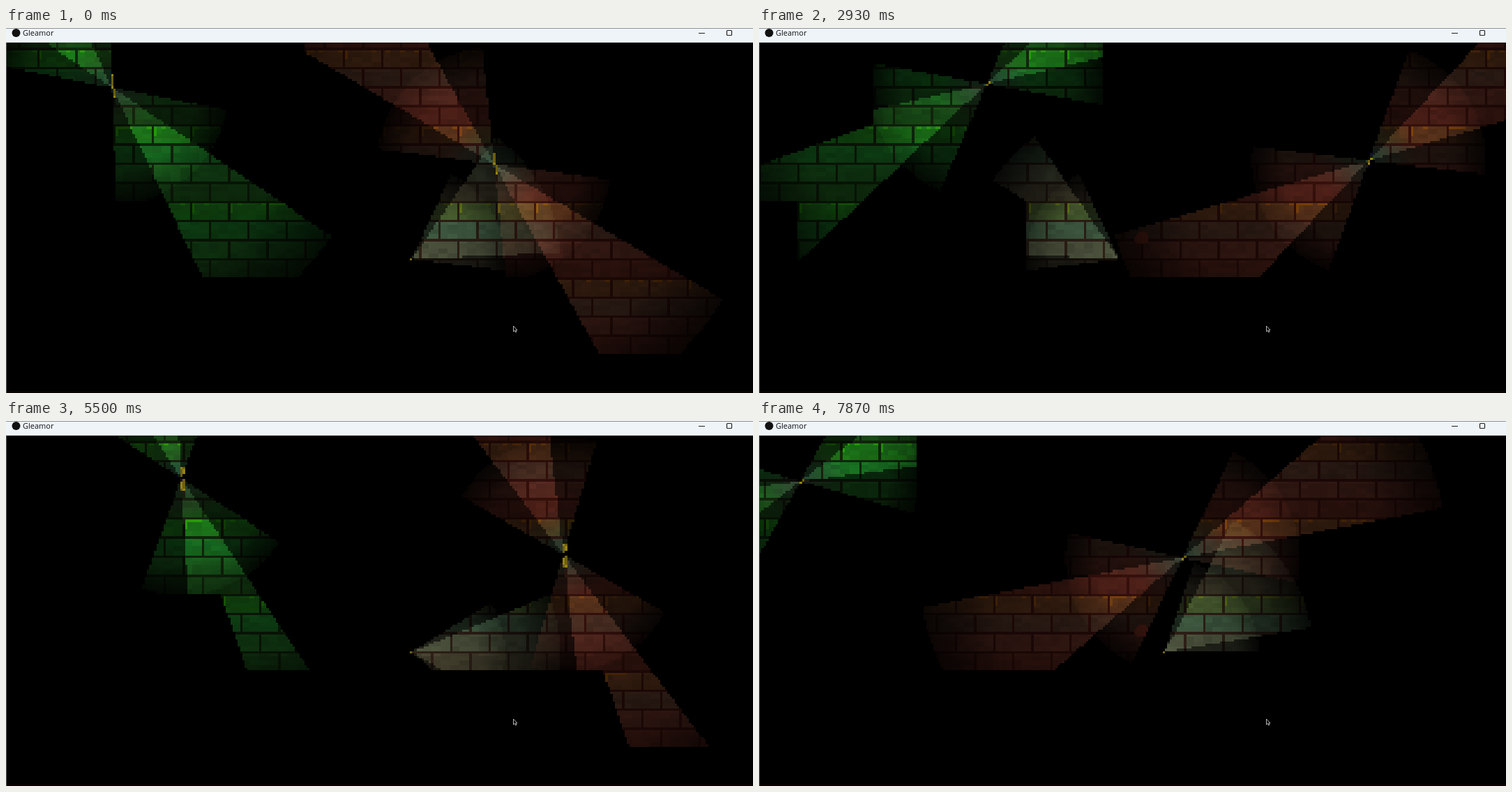
An HTML page with a canvas that plays this animation: 1071x523 px, repeating every 7.89 s.

```html
<!DOCTYPE html>
<html lang="en">
<head>
<meta charset="utf-8">
<title>Gleamor</title>
<style>
  html, body { margin: 0; width: 100%; height: 100%; overflow: hidden; background: #000; }
  #stage { position: relative; width: 1071px; height: 523px; overflow: hidden; background: #000; }
  canvas { position: absolute; left: 0; image-rendering: pixelated; }
  svg { position: absolute; left: 0; top: 0; }
  text { font: 11px "Open Sans", "Noto Sans", sans-serif; fill: #111; }
</style>
</head>
<body>
<div id="stage">
  <canvas id="view"></canvas>
  <svg width="1071" height="523" viewBox="0 0 1071 523">
    <rect width="1071" height="21" fill="#eff4f9"/>
    <rect width="1071" height="1" fill="#8d9196"/>
    <rect y="20" width="1071" height="1" fill="#c9ced3"/>
    <rect y="21" width="1" height="502" fill="#55585b"/>
    <rect x="1" y="521" width="1070" height="1" fill="#190307"/>
    <circle cx="14.5" cy="7" r="6" fill="#111"/>
    <text x="24" y="11">Gleamor</text>
    <path d="M993 7.5h9" stroke="#222" fill="none"/>
    <rect x="1033.5" y="3.5" width="7" height="7" rx="1" stroke="#222" fill="none" stroke-width="1.2"/>
    <path d="M727.5 427v8l1.9-1.6 1.3 2.6 1.2-.6-1.2-2.5h2.3z" fill="#000" stroke="#ddd" stroke-width=".8"/>
  </svg>
</div>
<script>
const LOOP = 7890, W = 314, H = 148, S = 3.425, TOP = 18.43, LAMP_Y = 19;
const RAYS = 1440, DEG = Math.PI / 180;

// Moments at which the picture is refreshed.
const STEPS = [0, 60, 250, 440, 620, 810, 990, 1160, 1310, 1470, 1620, 1770, 1930, 2080,
  2230, 2420, 2610, 2800, 3000, 3190, 3420, 3640, 3870, 4100, 4350, 4600, 4750, 4900, 5050,
  5200, 5350, 5500, 5610, 5750, 5970, 6190, 6410, 6610, 6830, 7040, 7250, 7450, 7660, 7870];
const SCROLL = [[0, 153.5], [470, 153.5], [810, 186], [2080, 309], [3870, 358], [4460, 358],
  [5500, 254], [5910, 213], [6410, 213], [7870, 60]];
const SPIN = [[0, 40.7], [810, 10], [2080, -35], [3870, -102], [5500, -161.5], [6410, -195.5], [7870, -247.5]];

const ROWS = [[126, 156, 92], [108, 148, 122], [126, 132, 112], [112, 102, 84]];
const MORTAR = [78, 52, 42], MOSS = [185, 215, 45], SKIN = [200, 165, 130];
const GREEN = [.2, .68, .25], RED = [.64, .29, .26], WHITE = [.52, .54, .47], HAZE = [.34, .4, .38];

const view = document.getElementById('view');
view.width = W;
view.height = H;
view.style.cssText = `top:${TOP}px;width:${W * S}px;height:${H * S}px`;
const ctx = view.getContext('2d');
const image = ctx.createImageData(W, H);

const mod = (a, n) => ((a % n) + n) % n;
const hash = (x, y) => mod(Math.sin(x * 12.99 + y * 78.23) * 43758.55, 1);

function lerp(keys, t) {
  let i = 1;
  while (i < keys.length - 1 && keys[i][0] < t) i++;
  const [t0, a] = keys[i - 1], [t1, b] = keys[i];
  return a + (b - a) * Math.min(1, (t - t0) / (t1 - t0));
}

// Level map in tiles, counted from the green lamp.
function solid(u, v) {
  if (v <= 0) return u === -4 || u === 3 || u === 4;
  if (v < 3) return false;
  if (u <= -6 || u === -1 || u === 0) return true;
  if (u < -3) return v >= 5;
  if (u < 0) return v >= 8;
  return v >= (u <= 10 ? 5 : 7);
}

function brick(x, y) {
  const row = Math.floor(y / 8), r = mod(row - 2, 4);
  const bx = x - (r % 2) * 8, mx = mod(bx, 16), my = mod(y, 8);
  if (!mx || !my) return MORTAR;
  const col = Math.floor(bx / 16), seed = hash(mod(col, 8), row);
  if (!r && ((mx === 1 && my < 5 && seed > .45) || (my === 1 && hash(mod(x >> 1, 32), row) > .65))) return MOSS;
  const k = .86 + .18 * hash(mod(x >> 2, 16), y >> 1) + .08 * seed + (my === 1 ? .06 : 0);
  return ROWS[r].map(c => c * k);
}

function castRays(light, camX) {
  const depth = new Float32Array(RAYS);
  for (let i = 0; i < RAYS; i++) {
    const a = (i / RAYS) * 2 * Math.PI, dx = Math.sin(a), dy = Math.cos(a);
    let d = 0;
    while (d < light.reach) {
      const u = Math.floor((light.x + dx * d - camX) / 16);
      const v = Math.floor((light.y + dy * d - LAMP_Y) / 16);
      if (solid(u, v)) break;
      d += .25;
    }
    depth[i] = d;
  }
  return depth;
}

function lamp(x, y, angle, color) {
  const sway = Math.sin(angle * DEG);
  return {
    x: x - .6, y: y + sway, angle, color, period: 180, reach: 111,
    cones: [[38.3, 49, .5], [15.2, 111, .68]], rod: { x, y, sway }
  };
}

function torch(t) {
  const right = t < 440 || t >= 4450;
  const walk = (t >= 440 && t < 2000) || (t >= 4450 && t < 5900);
  const aim = walk ? (right ? 94 : 97) : t > 6410 ? 60 - 6 * (t - 6410) / 1460 : 61;
  return {
    x: (right ? 582 : 516) / S, y: (331.5 - TOP) / S, angle: (right ? 1 : -1) * (180 - aim),
    color: WHITE, period: 360, reach: 62, cones: [[36, 39, .52], [26.5, 62, .66]], right
  };
}

// The sliver past the ledge closes with a straight edge to the pit corner.
function ledgeCut(light, camX) {
  const a = mod(light.angle + 90, 180) - 90 - 15.2;
  if (a < -33 || a > -18.6) return null;
  const dy = 80 - (light.y - LAMP_Y);
  return { x: camX - 16, y: LAMP_Y + 48, ex: light.x + dy * Math.tan(a * DEG), ey: LAMP_Y + 80 };
}

function offAxis(light, a) {
  const p = light.period;
  return Math.abs(mod(a - light.angle + p / 2, p) - p / 2);
}

function shine(light, x, y) {
  const dx = x - light.x, dy = y - light.y, d = Math.hypot(dx, dy);
  if (d > light.reach) return 0;
  const a = Math.atan2(dx, dy) / DEG, off = offAxis(light, a);
  if (off > light.cones[0][0]) return 0;
  if (d > light.depth[Math.round(mod(a, 360) * RAYS / 360) % RAYS]) return 0;
  const c = light.cut;
  if (c && y > c.y && x < c.x && (c.ex - c.x) * (y - c.y) - (c.ey - c.y) * (x - c.x) < 0) {
    return 0;
  }
  let sum = 0;
  for (const [half, range, power] of light.cones) {
    const q = d / range;
    if (off <= half && q < 1) sum += power * (1 - .35 * q) * Math.min(1, (1 - q) * 2.6 + .32);
  }
  return sum;
}

// The gold rod shows only where its own beams touch it.
function drawRod(light) {
  const { x, y, sway } = light.rod;
  for (let i = -1; i < 1; i++) {
    for (let j = -5; j < 5; j++) {
      const a = Math.atan2(i + .5, j + .5 - sway) / DEG;
      if (offAxis(light, a) > light.cones[0][0]) continue;
      ctx.fillStyle = mod(i + (j >> 2), 2) ? '#968216' : '#6c5e12';
      ctx.fillRect(x + i, y + j, 1, 1);
    }
  }
}

function draw(t) {
  const camX = Math.round(lerp(SCROLL, t) / S), spin = lerp(SPIN, t);
  const green = lamp(camX, LAMP_Y, spin, GREEN);
  const red = lamp(camX + 160, LAMP_Y + 32, spin + 3.5, RED);
  const hand = torch(t), lights = [green, red, hand];
  for (const l of lights) l.depth = castRays(l, camX);
  green.cut = ledgeCut(green, camX);

  const out = image.data;
  for (let y = 0, p = 0; y < H; y++) {
    for (let x = 0; x < W; x++, p += 4) {
      const wx = x - camX, wy = y - LAMP_Y, px = x + .5, py = y + .5;
      const rgb = [0, 0, 0];
      let lit = false;
      if (!solid(Math.floor(wx / 16), Math.floor(wy / 16))) {
        for (const l of lights) {
          const power = shine(l, px, py);
          if (!power) continue;
          lit = true;
          const near = l === hand ? 0 : Math.max(0, 1 - Math.hypot(px - l.x, py - l.y) / 20);
          for (let i = 0; i < 3; i++) {
            rgb[i] += power * (l.color[i] + (HAZE[i] - l.color[i]) * near);
          }
        }
      }
      if (lit) {
        const head = Math.hypot((px - 160.3) / 3, (py - 82.7) / 2.6) < 1;
        const tex = head ? SKIN : brick(wx, wy);
        for (let i = 0; i < 3; i++) rgb[i] *= tex[i];
      }
      out[p] = rgb[0];
      out[p + 1] = rgb[1];
      out[p + 2] = rgb[2];
      out[p + 3] = 255;
    }
  }
  ctx.putImageData(image, 0, 0);
  drawRod(green);
  drawRod(red);
  if (hand.right) {
    ctx.fillStyle = '#6e6618';
    ctx.fillRect(Math.floor(hand.x), Math.floor(hand.y), 1, 1);
  }
}

let shown = -1;
const start = performance.now();
function tick() {
  const t = (performance.now() - start) % LOOP;
  let i = STEPS.length - 1;
  while (STEPS[i] > t) i--;
  if (i !== shown) draw(STEPS[shown = i]);
  requestAnimationFrame(tick);
}
tick();
</script>
</body>
</html>
```
